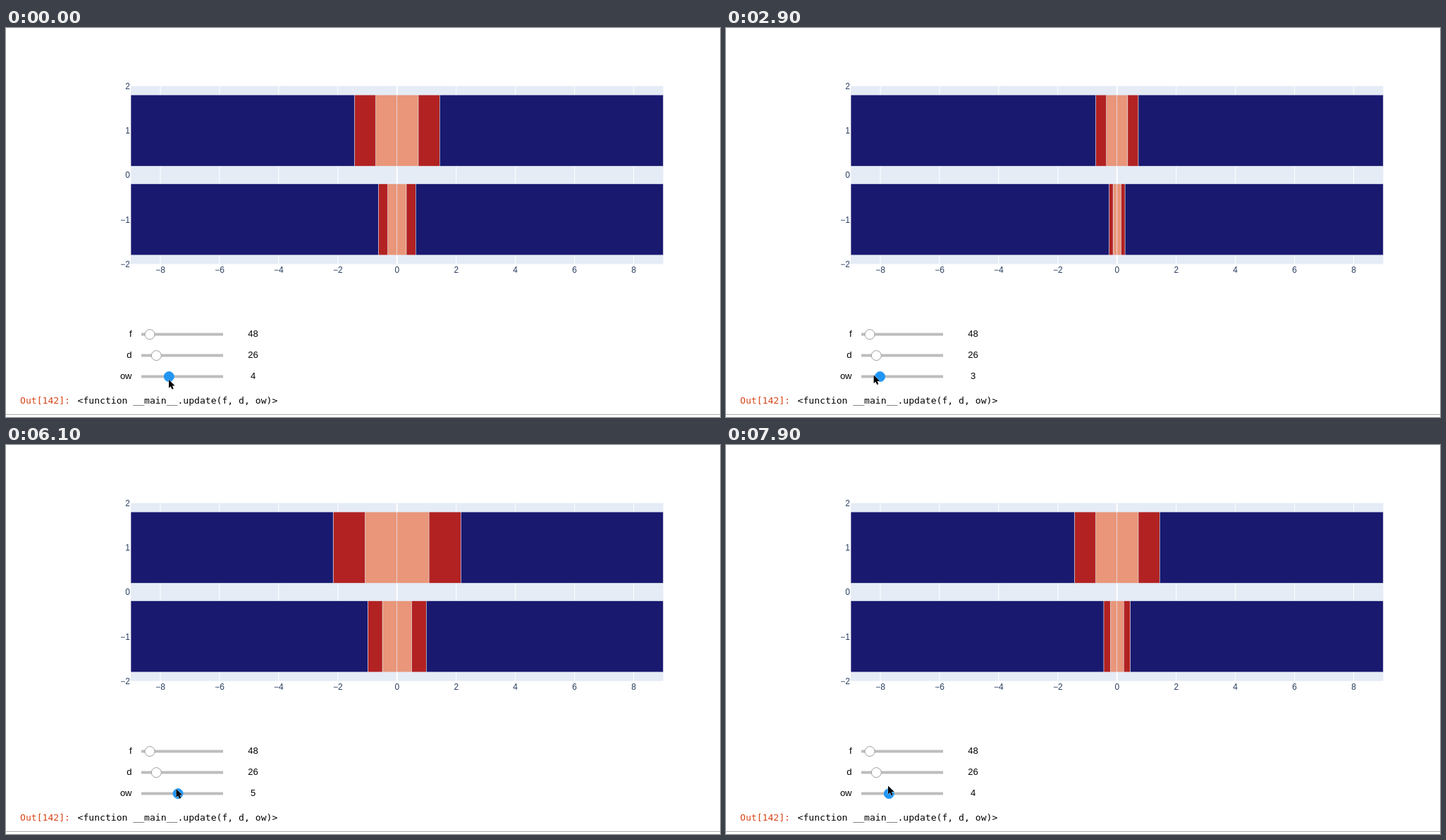
Animation of 1013 by 553 pixels, one loop 8 s. Source, as an HTML page:

```html
<!DOCTYPE html>
<html lang="en">
<head>
<meta charset="utf-8">
<title>Slider plot</title>
<style>
  html, body { margin: 0; width: 100%; height: 100%; overflow: hidden; background: #fff; }
  svg { display: block; }
  text { font: 13px "Liberation Sans", Arial, sans-serif; white-space: pre; }
  .tick { font-size: 12px; fill: #2a3f5f; }
  .mono { font: 13.1px "DejaVu Sans Mono", monospace; }
  .mid { text-anchor: middle; }
  .end { text-anchor: end; }
</style>
</head>
<body>
<svg id="stage" width="1013" height="553" viewBox="0 0 1013 553">
  <clipPath id="plot"><rect x="177" y="82.5" width="755.5" height="253"/></clipPath>
</svg>
<script>
const LOOP = 8000, STEP = 100;
const CX = 554.8, CY = 209, UX = 41.97, UY = 63.25;
const COLORS = ['#e9967a', '#b22222', '#191970'];
const stage = document.getElementById('stage');

function add(tag, attrs, parent = stage) {
  const node = document.createElementNS('http://www.w3.org/2000/svg', tag);
  set(node, attrs);
  parent.append(node);
  return node;
}
function set(node, attrs) {
  for (const key in attrs) node.setAttribute(key, attrs[key]);
}
function label(str, x, y, cls, fill = '#000') {
  const node = add('text', { x, y, class: cls, fill });
  node.textContent = str;
  return node;
}

// Plot background, grid and ticks
add('rect', { x: 177, y: 82.5, width: 755.5, height: 253, fill: '#e5ecf6' });
const signed = n => String(n).replace('-', '\u2212');
for (let n = -8; n <= 8; n += 2) {
  const w = n ? 1 : 2;
  add('rect', { x: CX + n * UX - w / 2, y: 82.5, width: w, height: 253, fill: '#fff' });
  label(signed(n), CX + n * UX, 348, 'tick mid');
}
for (let n = -2; n <= 2; n++) label(signed(n), 176, CY - n * UY + 4.3, 'tick end');

// Two rows of three stacked parts, mirrored about zero
const plot = add('g', { 'clip-path': 'url(#plot)' });
const bars = [];
for (const row of [0, 1])
  for (const part of [0, 1, 2])
    for (const side of [-1, 1])
      bars.push({ row, part, side, node: add('rect', {
        y: row ? CY + 0.2 * UY : CY - 1.8 * UY, height: 1.6 * UY,
        fill: COLORS[part], stroke: '#e5ecf6', 'stroke-width': 0.5
      }, plot) });

function slider(name, value, x, y, active) {
  label(name, 178.5, y + 4, 'end');
  add('rect', { x: 192, y: y - 1.5, width: 116, height: 4, fill: '#bdbdbd' });
  const thumb = add('circle', { cx: x, cy: y + 0.6, r: 7,
    fill: active ? '#2196f3' : '#fff', stroke: active ? '#2196f3' : '#9e9e9e' });
  return { thumb, value: label(value, 350.5, y + 4, 'mid') };
}
slider('f', 48, 204, 435);
slider('d', 26, 213.3, 465);
const ow = slider('ow', 4, 231.3, 495, true);

label('Out[142]:', 20, 534, 'mono', '#d84315');
label('<function __main__.update(f, d, ow)>', 101.5, 534, 'mono');
add('rect', { x: 0, y: 549, width: 1013, height: 1, fill: '#ababab' });

const cursor = add('path', {
  d: 'M0 0V11.8L2.7 9.4L4.6 13.7L6.7 12.8L4.9 8.6H8.6Z',
  fill: '#000', stroke: '#fff', 'stroke-width': 0.7, 'paint-order': 'stroke'
});

// Each drag moves the slider by whole steps at an even pace
const DRAGS = [
  { start: 1010, dir: -1, steps: 1 },
  { start: 2105, dir: -1, steps: 1 },
  { start: 2810, dir: 1, steps: 5, every: 425 },
  { start: 5410, dir: -1, steps: 4, every: 592 },
  { start: 7580, dir: 1, steps: 1 }
];
// The plot follows the slider, one part after another
const LAG = 120, PART_GAP = 75;
// Pointer stops: time, x, y
const PATH = [
  [400, 231, 500], [700, 224, 494.5], [1000, 224, 494.5], [2000, 213, 494.5],
  [2800, 205, 494], [3600, 242, 489], [4700, 266.5, 484.5], [5400, 266.5, 484.5],
  [6100, 241.5, 489], [6600, 236.5, 489], [7200, 218, 487], [7900, 230, 484.5]
];

const clamp = (x, lo, hi) => Math.min(hi, Math.max(lo, x));
const inner = (row, v) => row ? 0.09 * v - 0.045 : Math.min(0.18 * v, 1.215);

function valueAt(t) {
  return DRAGS.reduce((v, { start, dir, steps, every = 1 }) =>
    v + dir * clamp(Math.floor((t - start) / every) + 1, 0, steps), 4);
}

function pointer(t) {
  const next = PATH.findIndex(p => p[0] > t);
  const i = next < 0 ? PATH.length - 1 : Math.max(next, 1);
  const [a, b] = [PATH[i - 1], PATH[i]];
  const k = clamp((t - a[0]) / (b[0] - a[0]), 0, 1);
  return [a[1] + (b[1] - a[1]) * k, a[2] + (b[2] - a[2]) * k];
}

function draw(t) {
  const sizes = [0, 1].map(row => [0, 1, 2].map(part => {
    const w = inner(row, valueAt(t - LAG - PART_GAP * (row * 3 + part)));
    return part < 2 ? w : 9 - 2 * w;
  }));
  for (const { row, part, side, node } of bars) {
    const from = sizes[row].slice(0, part).reduce((a, b) => a + b, 0);
    const w = sizes[row][part];
    set(node, { x: CX + UX * (side > 0 ? from : -from - w), width: UX * w });
  }
  const v = valueAt(t);
  set(ow.thumb, { cx: 231.3 + (v - 4) * 12.75 });
  ow.value.textContent = v;
  set(cursor, { transform: `translate(${pointer(t)})` });
}

const begin = performance.now();
function tick() {
  const t = (performance.now() - begin) % LOOP;
  draw(Math.floor(t / STEP) * STEP);
  requestAnimationFrame(tick);
}
tick();
</script>
</body>
</html>
```
